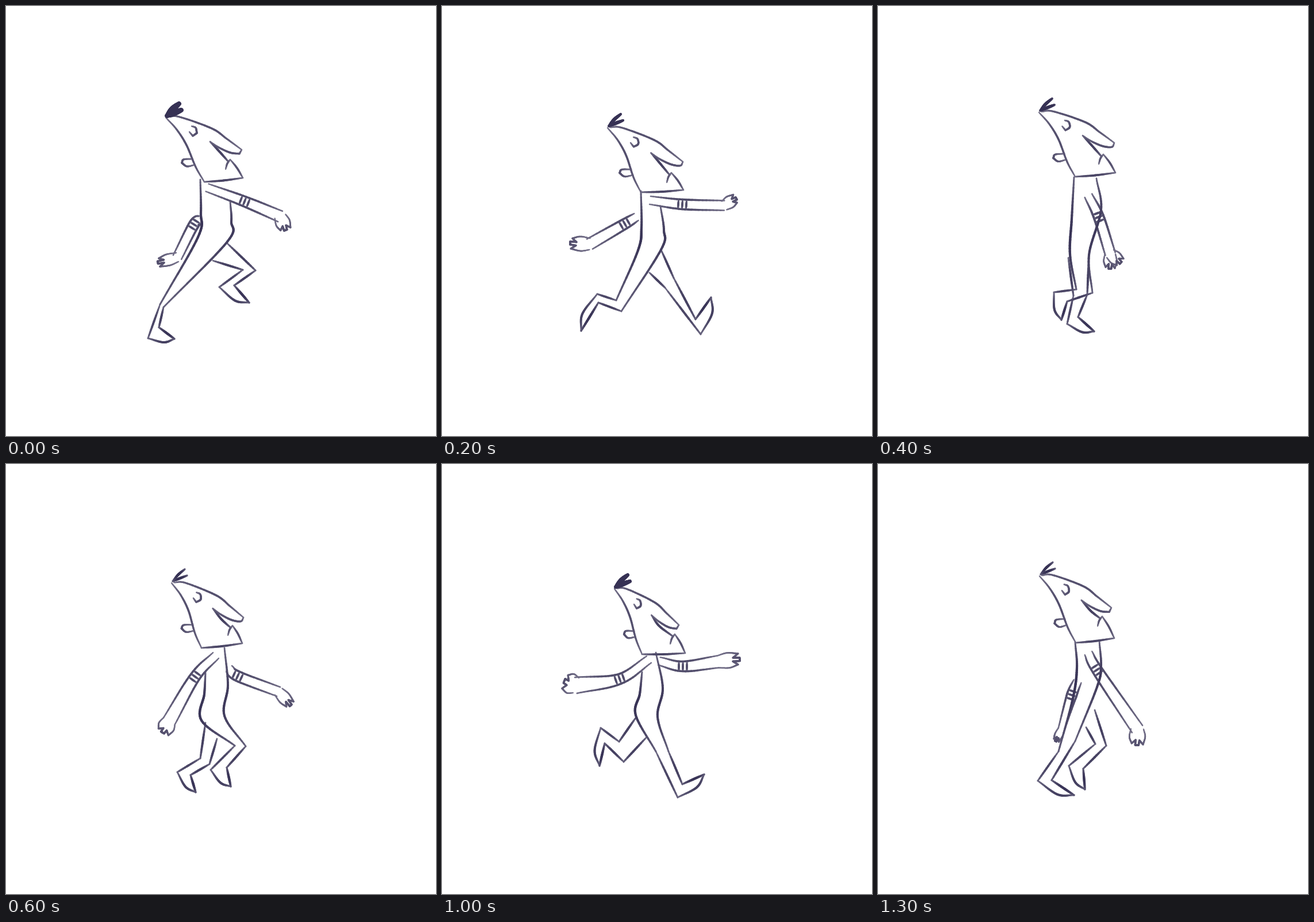
An HTML page with a canvas that plays this animation: 748 by 748 pixels, repeating every 1400 ms.

```html
<!DOCTYPE html>
<html lang="en">
<head>
<meta charset="utf-8">
<title>Strutting walk</title>
<style>
html, body { margin: 0; width: 100%; height: 100%; overflow: hidden; background: #fff; }
canvas { display: block; filter: blur(.4px); }
</style>
</head>
<body>
<canvas id="stage" width="748" height="748"></canvas>
<script>
const ctx = document.getElementById("stage").getContext("2d");
const STEP = 100, STEPS = 14;

// Every joint track holds one x, y pair per key step.
const KEYS = [0, 2, 4, 6, 8, 10, 13];

const head = {
  crown: [278, 194, 288, 212, 280, 185, 288, 207, 291, 211, 300, 217, 281, 195],
  nose: [410, 251, 419, 272, 411, 239, 413, 268, 411, 272, 412, 281, 406, 251],
  jaw: [345, 306, 346, 324, 343, 297, 340, 320, 345, 324, 348, 331, 344, 311],
  chin: [412, 299, 420, 320, 413, 290, 411, 312, 417, 317, 423, 329, 411, 303],
  lip: [390, 267, 399, 290, 392, 258, 394, 281, 401, 287, 405, 296, 390, 265]
};
const hairWidth = [11, 6, 5.5, 4.5, 7.5, 8.5, 4.5];

const body = {
  neckB: [338, 302, 346, 322, 341, 298, 347, 363, 348, 362, 348, 362, 343, 310],
  waistB: [339, 360, 347, 385, 337, 370, 345, 400, 344, 397, 344, 400, 346, 355],
  neckF: [390, 340, 380, 348, 380, 300, 380, 320, 384, 322, 372, 328, 385, 308],
  waistF: [392, 375, 386, 390, 388, 355, 386, 385, 389, 375, 384, 390, 388, 352]
};

const armNear = {
  shoulder: [350, 316, 362, 338, 366, 330, 365, 333, 359, 338, 360, 340, 366, 329],
  cuff: [415, 340, 418, 345, 384, 367, 329, 370, 319, 367, 309, 374, 381, 358],
  wrist: [477, 366, 491, 347, 404, 431, 284, 447, 245, 440, 233, 385, 451, 461],
  tip: [486, 390, 512, 335, 403, 457, 272, 467, 225, 445, 213, 377, 450, 489]
};
const armFar = {
  shoulder: [338, 372, 338, 367, 366, 330, 388, 356, 391, 345, 378, 343, 347, 378],
  cuff: [327, 380, 318, 379, 384, 367, 403, 369, 406, 353, 419, 352, 337, 402],
  wrist: [298, 437, 257, 414, 404, 431, 474, 396, 497, 362, 480, 344, 319, 461],
  tip: [264, 446, 223, 412, 422, 447, 495, 420, 523, 372, 518, 340, 309, 482]
};
const wristNear = [20, 17, 18, 23, 26, 28, 22];
const wristFar = [16, 20, 18, 17, 19, 21, 11];

const legNear = {
  hipB: [334, 402, 341, 425, 334, 432, 340, 446, 338, 443, 337, 437, 339, 408],
  hipF: [385, 410, 381, 424, 367, 433, 380, 438, 378, 436, 375, 440, 381, 388],
  kneeB: [268, 519, 303, 512, 345, 493, 398, 490, 398, 482, 372, 500, 314, 500],
  kneeF: [274, 524, 312, 531, 373, 499, 417, 491, 422, 474, 394, 500, 343, 482],
  heel: [247, 578, 270, 501, 306, 498, 356, 532, 378, 528, 410, 580, 278, 551],
  ankle: [266, 559, 272, 516, 329, 514, 384, 528, 408, 516, 418, 557, 302, 550],
  toe: [293, 579, 242, 565, 319, 546, 391, 561, 426, 557, 456, 540, 341, 576]
};
const legFar = {
  hipB: [360, 443, 361, 464, 331, 438, 347, 450, 340, 446, 338, 440, 362, 458],
  hipF: [385, 413, 381, 424, 367, 434, 367, 478, 355, 460, 356, 475, 377, 428],
  kneeB: [412, 459, 388, 490, 340, 504, 338, 512, 320, 509, 308, 483, 378, 487],
  kneeF: [434, 460, 403, 473, 364, 502, 354, 522, 333, 520, 316, 518, 397, 490],
  heel: [371, 489, 450, 571, 329, 553, 298, 536, 265, 512, 276, 459, 332, 525],
  ankle: [397, 486, 441, 545, 348, 541, 321, 541, 293, 527, 283, 486, 357, 530],
  toe: [423, 516, 468, 507, 376, 566, 330, 571, 293, 572, 274, 525, 360, 566]
};

// Face lines as drawn at the first key step; they follow crown, nose and jaw.
const face = {
  skull: [278, 194, 297, 215, 314, 242, 330, 280, 345, 306],
  bridge: [282, 193, 302, 193, 358, 213, 384, 231, 410, 250],
  snout: [410, 250, 406, 257, 390, 255, 370, 246, 355, 236],
  eye: [319, 219, 325, 226, 332, 221, 330, 212, 323, 209],
  ear: [329, 276, 315, 279, 306, 273, 309, 267, 325, 266]
};
const mouthStart = [355, 236], mouthBend = [372, 254];

// Hand outline: along the palm, across the wrist.
const hand = [0, -.5, .45, -.65, .95, -.5, .7, -.2, 1, -.15, 1, .12, .68, .1, .9, .4, .5, .6, 0, .5];

const lerp = (a, b, t) => a + (b - a) * t;
const add = (a, b, k = 1) => [a[0] + b[0] * k, a[1] + b[1] * k];
const sub = (a, b) => add(a, b, -1);
const mix = (a, b, t) => [lerp(a[0], b[0], t), lerp(a[1], b[1], t)];
const size = v => Math.hypot(v[0], v[1]);
const unit = v => [v[0] / size(v), v[1] / size(v)];
const side = v => [-v[1], v[0]];
const pair = (list, i) => [list[2 * i], list[2 * i + 1]];
const pairs = list => Array.from({ length: list.length / 2 }, (_, i) => pair(list, i));

function swing(a, b, t, pivot) {
  const p = sub(a, pivot), q = sub(b, pivot);
  const from = Math.atan2(p[1], p[0]);
  let turn = Math.atan2(q[1], q[0]) - from;
  turn -= Math.round(turn / (2 * Math.PI)) * 2 * Math.PI;
  const r = lerp(size(p), size(q), t), angle = from + turn * t;
  return add(pivot, [Math.cos(angle), Math.sin(angle)], r);
}

// Curve direction at b, split in two where the pen turns sharply.
function tangents(a, b, c) {
  const u = sub(b, a), v = sub(c, b);
  const turn = (u[0] * v[0] + u[1] * v[1]) / (size(u) * size(v) || 1);
  if (turn < .4) return [u, v];
  const m = mix(u, v, .5);
  return [m, m];
}

function curve(pts) {
  const last = pts.length - 1;
  const tan = pts.map((p, i) => {
    if (i && i < last) return tangents(pts[i - 1], p, pts[i + 1]);
    const d = i ? sub(p, pts[i - 1]) : sub(pts[1], p);
    return [d, d];
  });
  const out = [pts[0]];
  for (let i = 0; i < last; i++) {
    for (let k = 1; k <= 12; k++) {
      const t = k / 12, s = 1 - t;
      out.push([0, 1].map(j =>
        pts[i][j] * s * s * (1 + 2 * t) + tan[i][1][j] * t * s * s +
        pts[i + 1][j] * t * t * (3 - 2 * t) - tan[i + 1][0][j] * t * t * s));
    }
  }
  return out;
}

function ink(w) {
  const k = Math.max(0, Math.min(1, (w - 1.3) / 3.2));
  return `rgb(${lerp(150, 54, k)},${lerp(147, 49, k)},${lerp(166, 84, k)})`;
}

function trace(width, pts) {
  for (let i = 1; i < pts.length; i++) {
    const w = width * (.65 + .35 * Math.sin(Math.PI * (i - .5) / pts.length));
    ctx.lineWidth = w;
    ctx.strokeStyle = ink(w);
    ctx.beginPath();
    ctx.moveTo(...pts[i - 1]);
    ctx.lineTo(...pts[i]);
    ctx.stroke();
  }
}

const pen = (width, ...pts) => trace(width, curve(pts));

function drawHead(h, hair) {
  const [o, n, j] = [head.crown, head.nose, head.jaw].map(list => pair(list, 0));
  const u = sub(n, o), v = sub(j, o), det = u[0] * v[1] - u[1] * v[0];
  const place = p => {
    const d = sub(p, o);
    const a = (d[0] * v[1] - d[1] * v[0]) / det, b = (u[0] * d[1] - u[1] * d[0]) / det;
    return add(add(h.crown, sub(h.nose, h.crown), a), sub(h.jaw, h.crown), b);
  };
  for (const name in face) pen(3.5, ...pairs(face[name]).map(place));
  pen(4, place(mouthStart), place(mouthBend), add(h.lip, [-3, 4]));
  pen(3.2, add(h.lip, [-8, 17]), add(h.lip, [-5, 7]), h.lip);
  pen(3.4, h.lip, add(mix(h.lip, h.chin, .5), [1, -1]), h.chin);
  pen(3.8, h.chin, add(mix(h.chin, h.jaw, .5), [0, 1]), h.jaw);
  for (const [x, y] of [[23, -24], [27, -13]]) {
    pen(hair, add(h.crown, [2, -3]), add(h.crown, [x * .5, y * .6]), add(h.crown, [x, y]));
  }
}

function drawArm(a, wide) {
  const mid = curve([a.shoulder, a.cuff, a.wrist]);
  const last = mid.length - 1, half = last / 2;
  const dir = i => unit(sub(mid[Math.min(last, i + 1)], mid[Math.max(0, i - 1)]));
  const width = i => i < half ? lerp(14, 17, i / half) : lerp(17, wide, i / half - 1);
  for (const s of [-.5, .5]) trace(3.6, mid.map((p, i) => add(p, side(dir(i)), s * width(i))));
  const along = dir(half), across = side(along);
  for (const d of [-7, 0, 7]) {
    const c = add(a.cuff, along, d);
    pen(3.6, add(c, across, -8), add(c, across, 8));
  }
  const palm = sub(a.tip, a.wrist), cross = side(unit(palm));
  pen(3.5, ...pairs(hand).map(([x, y]) => add(add(a.wrist, palm, x), cross, y * wide)));
}

function drawLeg(l) {
  pen(3.8, l.kneeB, l.heel);
  pen(4, l.kneeF, l.ankle);
  pen(4.4, l.ankle, l.toe);
  const sole = sub(l.toe, l.heel);
  const inner = sub(l.ankle, l.heel);
  const out = sole[0] * inner[1] - sole[1] * inner[0] > 0 ? -.14 : .14;
  pen(4, l.heel, add(add(l.heel, sole, .6), side(sole), out), l.toe);
}

function draw(step) {
  ctx.globalCompositeOperation = "source-over";
  ctx.fillStyle = "#fff";
  ctx.fillRect(0, 0, 748, 748);
  ctx.globalCompositeOperation = "darken";
  ctx.lineCap = "round";

  const i = KEYS.findLastIndex(k => k <= step), n = (i + 1) % KEYS.length;
  const t = (step - KEYS[i]) / ((KEYS[n] || STEPS) - KEYS[i]);
  const value = list => lerp(list[i], list[n], t);
  const pose = (part, pivot) => Object.fromEntries(Object.entries(part).map(([name, list]) => {
    const move = pivot && !/hip|shoulder/.test(name) ? swing : mix;
    return [name, move(pair(list, i), pair(list, n), t, pivot)];
  }));

  const shoulder = [365, 333], hip = [360, 420];
  const b = pose(body), near = pose(legNear, hip), far = pose(legFar, hip);
  drawArm(pose(armFar, shoulder), value(wristFar));
  pen(4, far.hipB, far.kneeB);
  pen(4, far.hipF, far.kneeF);
  drawLeg(far);
  pen(4.4, b.neckB, b.waistB, near.hipB, near.kneeB);
  pen(4.2, b.neckF, b.waistF, near.hipF, near.kneeF);
  drawLeg(near);
  drawArm(pose(armNear, shoulder), value(wristNear));
  drawHead(pose(head), value(hairWidth));
}

let shown = -1;
const start = performance.now();
function tick(now) {
  const step = Math.floor(Math.max(0, now - start) / STEP) % STEPS;
  if (step !== shown) draw(shown = step);
  requestAnimationFrame(tick);
}
tick(start);
</script>
</body>
</html>
```
